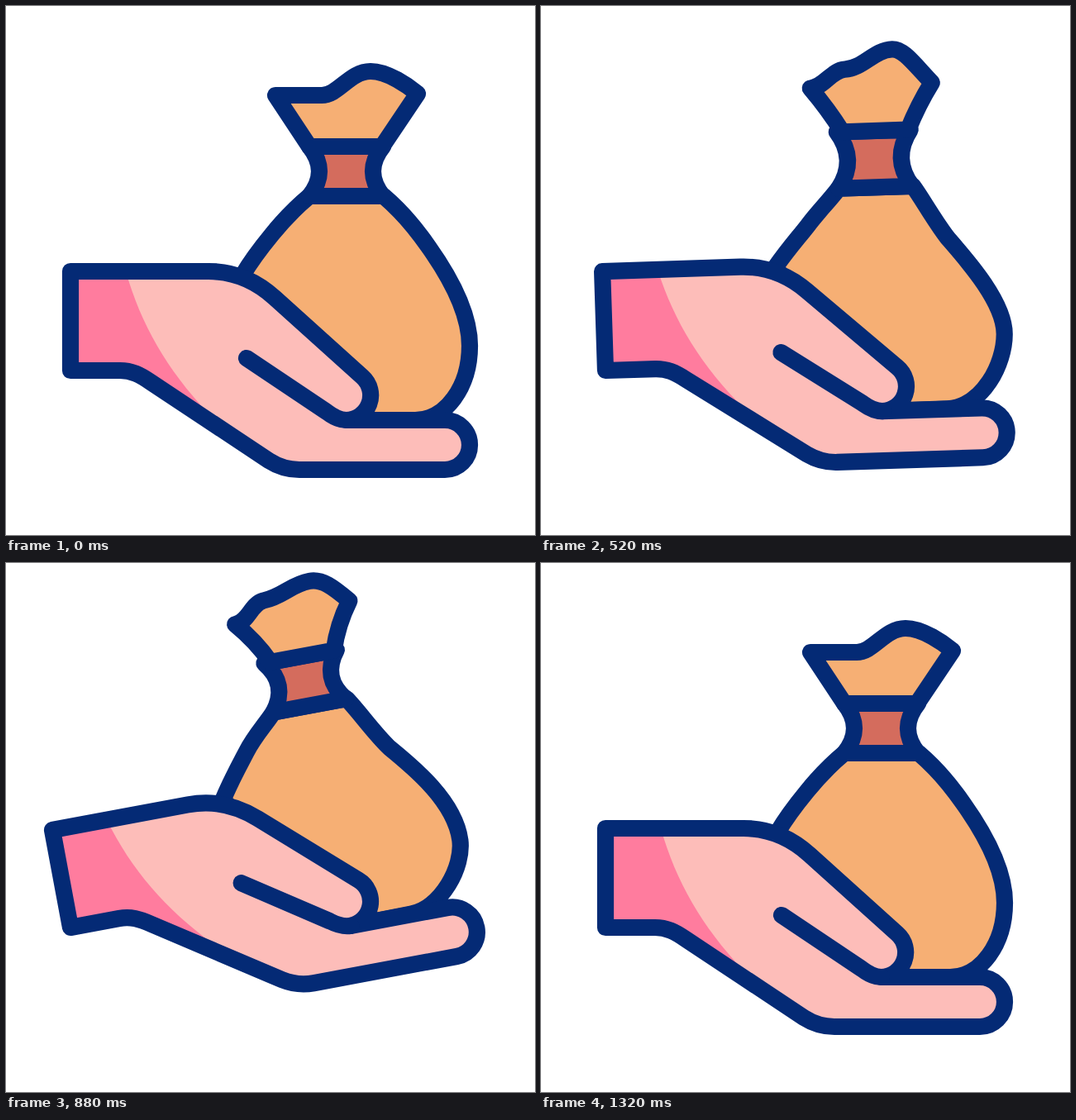
Animation of 640 by 640 pixels, one loop 1.48 s. Source, as an HTML page:

```html
<!DOCTYPE html>
<html lang="en">
<head>
<meta charset="utf-8">
<title>Hand weighing a money bag</title>
<style>
  html, body { margin: 0; width: 100%; height: 100%; overflow: hidden; background: #fff; }
  svg { display: block; width: 100vw; height: 100vh; }
  .line { stroke: #042a75; stroke-width: 20.2; stroke-linecap: round; stroke-linejoin: round; }
  .bag { fill: #f6af74; }
  .knot { fill: #d46c5d; }
  .skin { fill: #fdbdb9; }
  .cuff { fill: #ff7c9e; }
  .none { fill: none; }
  .streak { fill: none; stroke: #ffcc50; stroke-width: 20.5; stroke-linecap: round; }
</style>
</head>
<body>
<svg viewBox="0 0 640 640">
  <defs>
    <path id="hand" d="M78 321H245C275 321 302 332 325 353L431 448.500A30 30 0 0 1 411 501H531A30 30 0 0 1 531 561H355C342 561 329 557 318 550L175 455C162 446 152 441 138 441H78Z"/>
  </defs>
  <g id="scene">
    <path id="body" class="line bag"/>
    <path id="knot" class="line knot"/>
    <path id="top" class="line bag"/>
    <use href="#hand" class="skin"/>
    <path class="cuff" d="M78 321H145C163 385 195 440 244 492L175 455C162 446 152 441 138 441H78Z"/>
    <use href="#hand" class="line none"/>
    <path class="line none" d="M291 426L388 491Q401 501 412 501"/>
  </g>
  <g class="streaks">
    <path class="streak" pathLength="1" d="M219 282C244 301 259 343 261 386"/>
    <path class="streak" pathLength="1" d="M278 289C292 318 304 362 305 403"/>
  </g>
  <g class="streaks" transform="translate(137 188)">
    <path class="streak" pathLength="1" d="M219 282C244 301 259 343 261 386"/>
    <path class="streak" pathLength="1" d="M278 289C292 318 304 362 305 403"/>
  </g>
</svg>
<script>
const LOOP = 1480, STEP = 40;

// Poses: rest, dropped, lifted, rebound, rest
const times = [120, 360, 760, 1040, 1320];
const angles = [0, 8, -20, 4, 0];
const knotTops = [170, 155, 174, 163, 170];

const tops = [
  'M326 108C344 108 364 108 382 108C402 108 416 79 441 79C462 79 487 97 498 106Q476.500 138 455 170L367 170Q346.500 139 326 108Z',
  'M332.500 101C350 100 362 79 379 79C398 79 415 49 436 49C449 49 460 68 488.700 99.500Q471 127 453 155L373 155Q353 128 332.500 101Z',
  'M344.500 120C360 120 364 101 380 99.500C408 98 416 91 439 91C454 91 465 104 475 117Q457 143 454 174L375 174Q366 145 344.500 120Z',
  'M335.500 112C354 113 363 89 380 88C400 88 415 68 439 68C455 68 466 78 493 110Q471 136 451 163L374 163Q356 137 335.500 112Z'
];
const bodies = [
  'C349 245 335 260 322 276C308 293 296 309 286 326L330 400L420 501L495 501C532 501 561 461 561 411C561 371 538 329 511 291C495 268 477 247 457 230Z',
  'C355 248 345 263 332 278C320 291 306 301 288 321L330 400L420 501L495 501C546 500 564 438 564 400C564 372 520 319 499 292C483 270 468 246 457 230Z',
  'C352 242 335 247 321 266C308 284 297 304 288 324L330 400L420 501L480 500C510 499 555 466 558 436C562 378 518 326 494 299C480 280 468 246 457 230Z',
  'C356 247 347 264 334 279C322 292 305 303 288 320L330 400L420 501L495 501C546 500 565 440 565 404C565 372 524 324 502 296C485 272 469 248 457 230Z'
].map(d => 'M367 230' + d);
tops.push(tops[0]);
bodies.push(bodies[0]);

const $ = id => document.getElementById(id);
const mix = (a, b, p) => a + (b - a) * p;
const clamp = v => Math.min(1, Math.max(0, v));
const ease = (t, from, to) => {
  const s = clamp((t - from) / (to - from));
  return s * s * (3 - 2 * s);
};
const mixPath = (a, b, p) => {
  const goal = b.match(/[\d.]+/g);
  let i = 0;
  return a.replace(/[\d.]+/g, n => mix(+n, +goal[i++], p).toFixed(2));
};

const streaks = [...document.querySelectorAll('.streaks')];

function trim(group, t) {
  const end = ease(t, 0, 200), start = ease(t, 80, 320);
  const shown = end - start;
  group.style.display = shown > 0.001 ? '' : 'none';
  for (const path of group.children) {
    path.style.strokeDasharray = `${shown} 2`;
    path.style.strokeDashoffset = -start;
  }
}

function draw(t) {
  let k = 0;
  while (k < times.length - 2 && t >= times[k + 1]) k++;
  const p = ease(t, times[k], times[k + 1]);
  const y = mix(knotTops[k], knotTops[k + 1], p);
  const upper = y + (230 - y) / 3, lower = 230 - (230 - y) / 3;

  $('scene').setAttribute('transform', `rotate(${mix(angles[k], angles[k + 1], p)} 78 441)`);
  $('top').setAttribute('d', mixPath(tops[k], tops[k + 1], p));
  $('body').setAttribute('d', mixPath(bodies[k], bodies[k + 1], p));
  $('knot').setAttribute('d',
    `M367 ${y}C383 ${upper} 383 ${lower} 367 230H456C440 ${lower} 440 ${upper} 456 ${y}Z`);
  trim(streaks[0], t - 120);
  trim(streaks[1], t - 560);
}

function tick() {
  const t = performance.now() % LOOP;
  draw(Math.floor(t / STEP) * STEP);
  requestAnimationFrame(tick);
}
tick();
</script>
</body>
</html>
```
